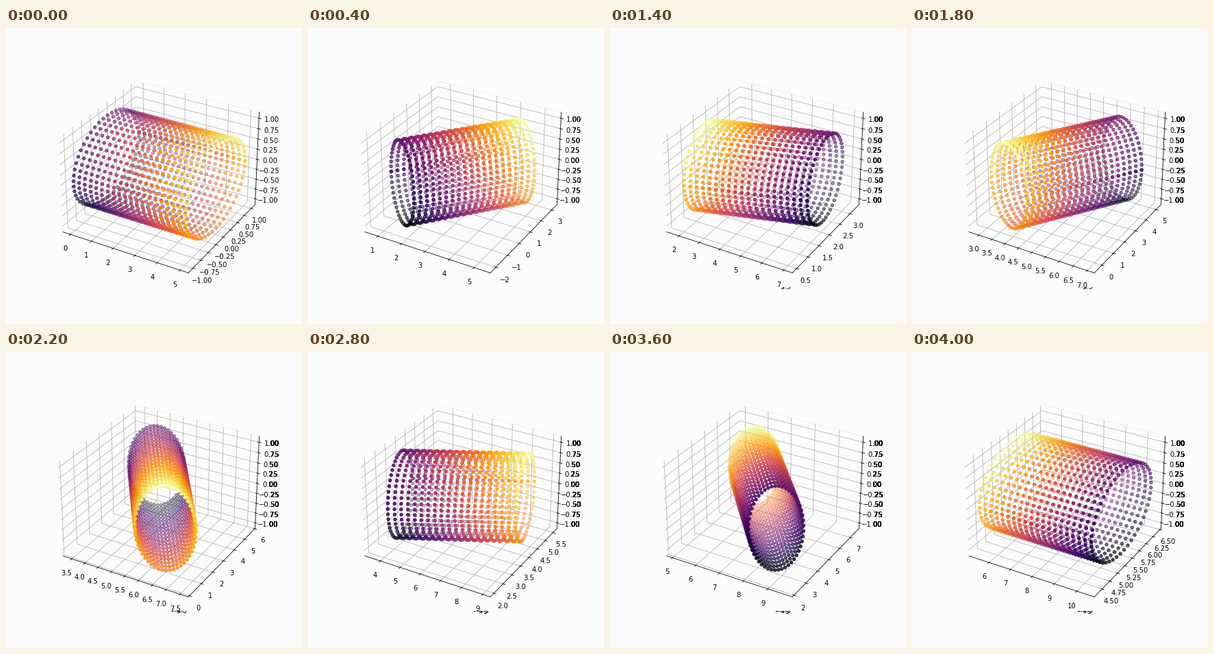
Recreate the animation shown at these times as a matplotlib script. Size 432 px wide and 432 px high, loop 4.2 s.

```python
import numpy as np
import matplotlib.pyplot as plt
from matplotlib.animation import FuncAnimation
from matplotlib.transforms import Bbox

FRAMES, INTERVAL = 21, 200
SIZE = 432
LENGTH, RADIUS = 5, 1
STEP = 0.27                 # drift per frame along x and y
TURN = np.radians(27)       # turn per frame about the vertical
MARGIN = (1.1 * 25 / 24 - 1) / 2
PAPER = "#fcfcfc"

plt.rcParams["font.family"] = "DejaVu Sans"
plt.rcParams["font.size"] = 10

fig = plt.figure(figsize=(SIZE / 72, SIZE / 72), dpi=72, facecolor=PAPER)
fig.subplots_adjust(left=0.125, right=0.9, bottom=0.125, top=0.88)
ax = fig.add_subplot(projection="3d", facecolor=PAPER)
for axis in (ax.xaxis, ax.yaxis, ax.zaxis):
    axis.set_pane_color(PAPER)
ax.yaxis.pane.set_edgecolor("#f0f0f0")

# Cylinder centred on the origin, lying along x
along, theta = np.meshgrid(np.linspace(-LENGTH / 2, LENGTH / 2, 20),
                           np.linspace(0, 2 * np.pi, 50))
along, theta = along.ravel(), theta.ravel()
across = RADIUS * np.cos(theta)
height = RADIUS * np.sin(theta)
shade = along + height

dots = None
ghosts = []


def padded(values):
    pad = MARGIN * np.ptp(values)
    return values.min() - pad, values.max() + pad


def pose(i):
    global dots
    if dots is not None:
        dots.remove()
    cos, sin = np.cos(TURN * i), np.sin(TURN * i)
    x = along * cos - across * sin + LENGTH / 2 + STEP * i
    y = along * sin + across * cos + STEP * i
    dots = ax.scatter(x, y, height, c=shade, cmap="inferno")
    ax.set_xlim(*padded(x))
    ax.set_ylim(*padded(y))
    ax.set_zlim(*padded(height))


def visible_labels():
    limits = (ax.get_xlim(), ax.get_ylim(), ax.get_zlim())
    for axis, (low, high) in zip((ax.xaxis, ax.yaxis, ax.zaxis), limits):
        for tick in axis.get_major_ticks():
            if low <= tick.get_loc() <= high and tick.label1.get_text():
                yield tick.label1


def collect_ghosts():
    """Label parts outside the plot box are never wiped; keep them per frame."""
    found = []
    for i in range(FRAMES):
        pose(i)
        fig.canvas.draw()
        box = ax.bbox
        below = Bbox([[0, 0], [SIZE, round(box.y0)]])
        beside = Bbox([[round(box.x1), 0], [SIZE, SIZE]])
        for label in visible_labels():
            extent = label.get_window_extent()
            for clip, outside in ((below, extent.y0 < box.y0),
                                  (beside, extent.x1 > box.x1)):
                if outside:
                    px, py = label.get_transform().transform(label.get_position())
                    found.append((i, px, py, label.get_text(),
                                  label.get_ha(), label.get_va(), clip))
    for i, px, py, text, ha, va, clip in found:
        ghost = fig.text(px / SIZE, py / SIZE, text, ha=ha, va=va, visible=False)
        ghost.set_clip_box(clip)
        ghost.set_clip_on(True)
        ghosts.append((i, ghost))


def update(i):
    pose(i)
    for born, ghost in ghosts:
        ghost.set_visible(born < i)
    return [dots]


collect_ghosts()
anim = FuncAnimation(fig, update, frames=FRAMES, interval=INTERVAL,
                     repeat=True, repeat_delay=0, blit=False)
plt.show()
```
